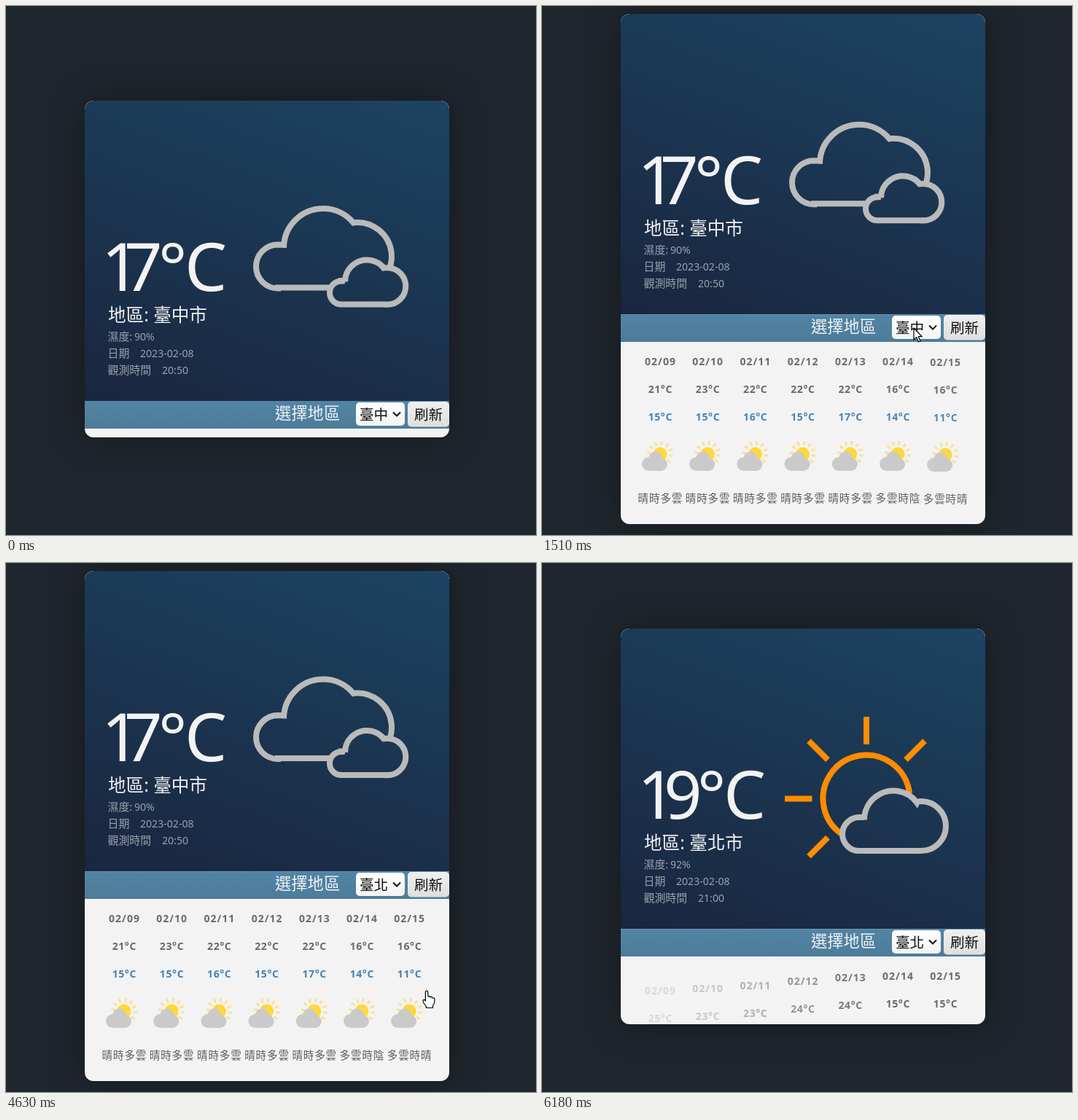
An HTML page with a canvas that plays this animation: 727 px wide and 726 px high, repeating every 6210 ms.

```html
<!DOCTYPE html>
<html lang="zh-Hant">
<head>
<meta charset="utf-8">
<title>Weather card</title>
<style>
html, body { margin: 0; width: 100%; height: 100%; overflow: hidden; background: #1f262d; }
canvas { display: block; }
</style>
</head>
<body>
<canvas id="stage" width="727" height="726"></canvas>
<script>
const ctx = document.getElementById('stage').getContext('2d');
const LOOP = 6210, CARD_X = 108, CARD_W = 500, TOP_H = 412, BAR_H = 38;
const HOVER_IN = 185, HOVER_OUT = 5680, REFRESH = 5190;
const LATIN = '"Noto Sans", "Open Sans"';
const CJK = '"Noto Sans CJK TC", "Noto Sans CJK JP", "Noto Sans CJK", sans-serif';
const FAMILY = LATIN + ', ' + CJK;

const DAYS = ['02/09', '02/10', '02/11', '02/12', '02/13', '02/14', '02/15'];
const TAICHUNG = {
  temp: [['1', 131], ['7', 162], ['°', 209], ['C', 245]],
  place: '臺中市', humidity: '90%', time: '20:50',
  high: [21, 23, 22, 22, 22, 16, 16],
  low: [15, 15, 16, 15, 17, 14, 11],
  sky: ['晴時多雲', '晴時多雲', '晴時多雲', '晴時多雲', '晴時多雲', '多雲時陰', '多雲時晴']
};
const TAIPEI = {
  temp: [['1', 131], ['9', 167], ['°', 213], ['C', 249]],
  place: '臺北市', humidity: '92%', time: '21:00',
  high: [25, 23, 23, 24, 24, 15, 15],
  low: [18, 16, 17, 18, 18, 13, 12],
  sky: ['多雲', '陰短暫雨', '多雲時晴', '多雲', '多雲短暫雨', '陰短暫雨', '陰天']
};

// time, x, y of the pointer's hot spot
const PATH = [
  [0, 684, 745], [60, 655, 712], [185, 586, 589], [400, 450, 520], [560, 419, 502],
  [700, 419, 502], [1100, 470, 468], [1400, 510, 442], [1800, 510, 442],
  [2150, 524, 634], [2350, 522, 600], [2600, 550, 527], [3850, 550, 527],
  [4150, 580, 440], [4380, 580, 440], [4500, 579, 536], [4620, 577, 587],
  [5060, 578, 589], [5250, 578, 589], [5560, 600, 640], [5630, 632, 668],
  [5710, 673, 716], [5780, 702, 750], [LOOP, 702, 750]
];

const clamp = v => Math.max(0, Math.min(1, v));

// cubic-bezier(.25, .1, .25, 1)
function ease(x) {
  if (x <= 0) return 0;
  if (x >= 1) return 1;
  let lo = 0, hi = 1, s = 0.5;
  for (let i = 0; i < 24; i++) {
    s = (lo + hi) / 2;
    const bx = 0.75 * s * (1 - s) + s * s * s;
    if (bx < x) lo = s; else hi = s;
  }
  return 0.3 * s * (1 - s) * (1 - s) + 3 * s * s * (1 - s) + s * s * s;
}

// 0 hidden, 1 shown, following the hover with a delay
function reveal(t, delay, span) {
  return t < HOVER_OUT
    ? ease((t - HOVER_IN - delay) / span)
    : 1 - ease((t - HOVER_OUT - delay) / span);
}

function floatOffset(t) {
  const half = 1280;
  if (t > 5120) t = Math.max(5120, t - 100);
  const n = Math.floor(t / half), p = ease(t / half - n);
  return 5 * (n % 2 ? 1 - p : p);
}

function text(s, x, y, size, color, weight = 400, align = 'left', spacing = 0) {
  ctx.font = `${weight} ${size}px ${FAMILY}`;
  ctx.letterSpacing = spacing + 'px';
  ctx.textAlign = align;
  ctx.fillStyle = color;
  ctx.fillText(s, align === 'center' ? x + spacing / 2 : x, y);
}

function box(x, y, w, h, r, fill) {
  ctx.beginPath();
  ctx.roundRect(x, y, w, h, r);
  ctx.fillStyle = fill;
  ctx.fill();
}

function vertical(y0, y1, a, b) {
  const g = ctx.createLinearGradient(0, y0, 0, y1);
  g.addColorStop(0, a);
  g.addColorStop(1, b);
  return g;
}

function disc(x, y, r) {
  ctx.beginPath();
  ctx.arc(x, y, r, 0, 7);
  ctx.fill();
}

function line(x0, y0, x1, y1) {
  ctx.beginPath();
  ctx.moveTo(x0, y0);
  ctx.lineTo(x1, y1);
  ctx.stroke();
}

const angle = (cx, cy, x, y) => Math.atan2(y - cy, x - cx);

function bigClouds() {
  ctx.strokeStyle = '#bababa';
  ctx.beginPath();
  ctx.moveTo(447, 386.5);
  ctx.lineTo(373, 386.5);
  ctx.arc(373, 357.5, 30, Math.PI / 2, Math.PI * 1.5);
  ctx.lineTo(381, 328);
  ctx.arc(435, 332, 54, Math.PI, angle(435, 332, 477, 297));
  ctx.arc(482, 344, 47, angle(482, 344, 477, 297), angle(482, 344, 526, 360));
  ctx.stroke();
  ctx.beginPath();
  ctx.moveTo(465, 377);
  ctx.lineTo(460, 377);
  ctx.arc(460, 393.5, 16, Math.PI * 1.5, Math.PI / 2, true);
  ctx.lineTo(523, 409.5);
  ctx.arc(523, 384.5, 25.3, Math.PI / 2, angle(523, 384, 518, 359), true);
  ctx.arc(495, 378.5, 30, angle(495, 378, 520, 361), Math.PI, true);
  ctx.closePath();
  ctx.stroke();
}

function sunAndCloud() {
  ctx.strokeStyle = '#ff8c00';
  ctx.beginPath();
  ctx.arc(445, 242, 59.5, angle(445, 242, 411, 291), -0.12);
  ctx.stroke();
  line(445, 130, 445, 168);
  line(333, 242.5, 370.5, 242.5);
  line(366, 163, 392, 189);
  line(525, 163, 499, 189);
  line(392, 295.5, 366, 321.5);
  ctx.strokeStyle = '#bababa';
  ctx.beginPath();
  ctx.moveTo(442, 268);
  ctx.lineTo(435, 268);
  ctx.arc(435, 291, 23, Math.PI * 1.5, Math.PI / 2, true);
  ctx.lineTo(520, 314);
  ctx.arc(520, 280, 34, Math.PI / 2, angle(520, 280, 515, 246), true);
  ctx.arc(482, 271.5, 40, angle(482, 271.5, 515.5, 247), Math.PI, true);
  ctx.closePath();
  ctx.stroke();
}

function sunnyIcon(x, y) {
  ctx.fillStyle = '#ffd83a';
  disc(x, y - 3, 9.5);
  ctx.strokeStyle = '#f9e394';
  ctx.lineWidth = 3;
  for (let i = 0; i < 12; i++) {
    const a = i * Math.PI / 6 + 0.13, c = Math.cos(a), s = Math.sin(a);
    line(x + c * 12.5, y - 3 + s * 12.5, x + c * 18, y - 3 + s * 18);
  }
  ctx.fillStyle = '#cacaca';
  disc(x - 15.5, y + 10.5, 9.5);
  disc(x - 6.5, y + 3, 9.5);
  disc(x + 1, y + 11, 9);
  ctx.fillRect(x - 15, y + 8, 16, 12);
}

function rainIcon(x, y) {
  ctx.fillStyle = '#8fbbea';
  ctx.fillRect(x - 6, y + 9, 2.5, 6);
  ctx.fillRect(x + 4, y + 9, 2.5, 9);
  ctx.fillStyle = '#cacaca';
  disc(x - 9.5, y + 2, 8.5);
  disc(x, y - 5.5, 9.5);
  disc(x + 9, y + 1, 8.5);
  disc(x - 2, y + 5, 7);
  disc(x + 6, y + 6, 6);
}

function pointer(shape, x, y) {
  ctx.beginPath();
  for (const [px, py] of shape) ctx.lineTo(x + px, y + py);
  ctx.closePath();
  ctx.lineJoin = 'round';
  ctx.lineWidth = 1.2;
  ctx.fillStyle = '#fff';
  ctx.strokeStyle = '#000';
  ctx.fill();
  ctx.stroke();
  ctx.lineJoin = 'miter';
}
const ARROW = [[0, 0], [0, 16], [3.7, 12.6], [6.4, 19], [9, 17.9], [6.3, 11.7], [11.2, 11.7]];
const HAND = [[-1.6, 1], [0, 0], [1.6, 1], [2, 8], [4.2, 7.6], [5.2, 8.8], [7, 8.4], [8, 9.8],
  [10, 9.8], [11, 11.4], [10.6, 17], [8.6, 20], [8.4, 23.5], [-0.4, 23.5], [-1, 21],
  [-4.6, 16], [-5, 13], [-3.4, 12.2], [-1.6, 14]];

function cursor(t) {
  const i = Math.max(0, PATH.findIndex(k => k[0] > t) - 1);
  const [t0, x0, y0] = PATH[i], [t1, x1, y1] = PATH[i + 1];
  const p = clamp((t - t0) / (t1 - t0));
  const arrow = t < HOVER_IN || (t > 1180 && t < 2450) || t > 5575;
  pointer(arrow ? ARROW : HAND, Math.round(x0 + (x1 - x0) * p), Math.round(y0 + (y1 - y0) * p));
}

function current(top, data, t) {
  // 20 degree gradient across the panel
  const s = Math.sin(Math.PI / 9), c = Math.cos(Math.PI / 9);
  const half = (CARD_W * s + TOP_H * c) / 2, cx = CARD_X + CARD_W / 2, cy = top + TOP_H / 2;
  const g = ctx.createLinearGradient(cx - s * half, cy + c * half, cx + s * half, cy - c * half);
  g.addColorStop(0, '#1a263f');
  g.addColorStop(1, '#1c4462');
  box(CARD_X, top, CARD_W, TOP_H, [12, 12, 0, 0], g);

  for (const [ch, x] of data.temp) text(ch, x, top + 261, 92, '#f3f3f3');
  text('地區: ' + data.place, 140, top + 303, 24.6, '#f3f3f3', 300);
  const dim = 'rgba(255,255,255,0.56)';
  const rows = [['濕度:', data.humidity, 176], ['日期', '2023-02-08', 184], ['觀測時間', data.time, 214]];
  rows.forEach(([label, value, x], i) => {
    text(label, 139.5, top + 329 + i * 23, 14.9, dim);
    text(value, x, top + 329 + i * 23, 14.1, dim);
  });

  ctx.save();
  ctx.lineWidth = 8;
  const dy = top + floatOffset(t);
  if (data === TAIPEI) {
    ctx.translate(0, dy - 13.7);
    sunAndCloud();
  } else {
    ctx.translate(0, dy - 130);
    bigClouds();
  }
  ctx.restore();
}

function bar(top, t) {
  const y = top + TOP_H;
  ctx.fillStyle = vertical(y, y + BAR_H, '#5184a4', '#4d7c99');
  ctx.fillRect(CARD_X, y, CARD_W, BAR_H);
  if (t > 1000) {
    ctx.fillStyle = 'rgba(255,255,255,0.14)';
    ctx.fillRect(CARD_X, y, CARD_W, 1);
  }
  text('選擇地區', 369, y + 24.5, 22.3, '#f0f3f5', 300);
  if (t > 1800 && t < 4250) box(478.5, y + 0.5, 70, 35, 6, '#101010');
  box(480, y + 2, 67, 32, 5, vertical(y, y + 35, '#ffffff', '#f3f3f3'));
  text(t < 2350 ? '臺中' : '臺北', 485, y + 25.5, 19.6, '#111', 300);
  ctx.strokeStyle = '#111';
  ctx.lineWidth = 2;
  ctx.beginPath();
  ctx.moveTo(531, y + 15.5);
  ctx.lineTo(536, y + 20.5);
  ctx.lineTo(541, y + 15.5);
  ctx.stroke();
  box(551, y + 1, 57, 34.5, 5, vertical(y, y + 35, '#f0f0f0', '#dfdfdf'));
  text('刷新', 560, y + 25.5, 19.6, '#111', 300);
}

function forecast(y, data, t) {
  DAYS.forEach((day, i) => {
    const p = reveal(t, i * 100, 1000);
    if (p <= 0) return;
    const x = 162 + i * 65.2, top = y + Math.round(25 * (1 - p)), sky = data.sky[i];
    ctx.globalAlpha = p;
    text(day, x, top + 32, 14, '#666b70', 600, 'center', 1);
    text(data.high[i] + '°C', x, top + 70, 14, '#666b70', 600, 'center', 0.6);
    text(data.low[i] + '°C', x, top + 108, 14, '#4682b4', 600, 'center', 0.6);
    (sky.includes('雨') ? rainIcon : sunnyIcon)(x, top + 157);
    text(sky.slice(0, 4), x, top + 219.5, 14.6, '#5c5c5c', 400, 'center', 0.8);
    if (sky.length > 4) text(sky.slice(4), x, top + 242.5, 14.6, '#5c5c5c', 400, 'center', 0.8);
  });
  ctx.globalAlpha = 1;
}

function draw(t) {
  const open = 12 + 238 * reveal(t, 0, 1300);
  const h = TOP_H + BAR_H + open, top = Math.round(361 - h / 2), tall = Math.round(h);
  const data = t < REFRESH ? TAICHUNG : TAIPEI;
  ctx.fillStyle = '#1f262d';
  ctx.fillRect(0, 0, 727, 726);
  ctx.save();
  ctx.shadowColor = 'rgba(0,0,0,0.35)';
  ctx.shadowBlur = 50;
  box(CARD_X, top, CARD_W, tall, 12, '#f3f3f3');
  ctx.restore();
  ctx.save();
  ctx.beginPath();
  ctx.roundRect(CARD_X, top, CARD_W, tall, 12);
  ctx.clip();
  current(top, data, t);
  forecast(top + TOP_H + BAR_H, data, t);
  bar(top, t);
  ctx.restore();
  cursor(t);
}

const start = performance.now();
function tick() {
  draw((performance.now() - start) % LOOP);
  requestAnimationFrame(tick);
}
tick();
</script>
</body>
</html>
```
